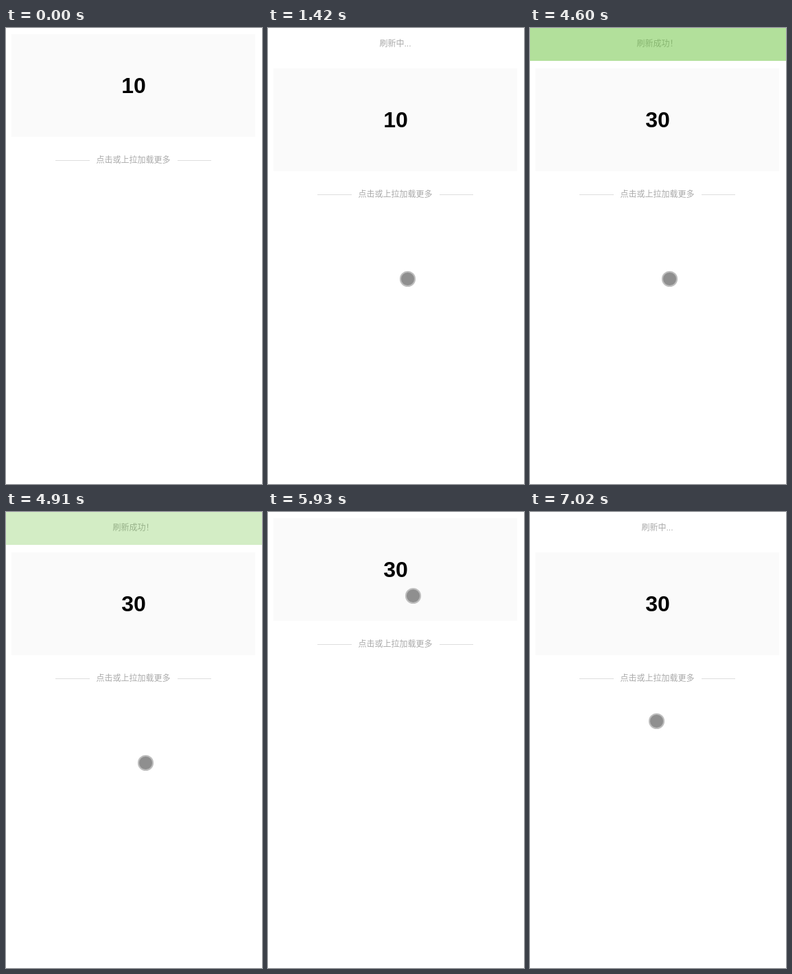
An HTML page for the animation above (8000 ms loop, 373x666 px).

```html
<!DOCTYPE html>
<html lang="zh-CN">
<head>
<meta charset="utf-8">
<title>Pull to refresh</title>
<style>
  html, body { margin: 0; width: 100%; height: 100%; overflow: hidden; background: #fff; }
  svg { display: block; width: 373px; height: 666px; }
  text { font: 12px "Liberation Sans", "Noto Sans CJK SC", "Noto Sans CJK", sans-serif; text-anchor: middle; fill: #aaa; }
  #count { font-size: 32px; font-weight: bold; fill: #000; }
  #touch { fill: #8f8f8f; stroke: #bebebe; stroke-width: 2; }
  #touch.pressed { fill: #c4c046; stroke: #e4e05a; }
</style>
</head>
<body>
<svg viewBox="0 0 373 666">
  <g id="page">
    <text id="status" x="185.5" y="-23"></text>
    <rect x="8" y="9" width="355" height="150" fill="#fafafa"/>
    <text id="count" x="186" y="95"></text>
    <path d="M72 193.5h50M250 193.5h49" stroke="#ddd"/>
    <text x="185.5" y="197">点击或上拉加载更多</text>
  </g>
  <rect id="flash" height="48" fill="#67c23a"/>
  <circle id="touch" r="10.6"/>
</svg>
<script>
const LOOP = 8000, HEAD = 50, LOADED = 4370, CLOSE = 5000;
const [page, status, count, flash, touch] =
  ['page', 'status', 'count', 'flash', 'touch'].map(id => document.getElementById(id));

const moves = [
  { start: 70, end: 720, x: 211, y: 144 },
  { start: 790, end: 1250, x: 203, y: 366 },
  { start: 5060, end: 5840, x: 211, y: 122 },
  { start: 5990, end: 7020, x: 184, y: 305 }
];
const pulls = [
  { press: 790, release: 1420, settled: 1420 },
  { press: 5990, release: 6710, settled: 7020 }
];

const set = (el, attrs) => Object.entries(attrs).forEach(([k, v]) => el.setAttribute(k, v));
const mix = (a, b, u) => a + (b - a) * u;

// Ease-out progress from 0 at start to 1 at end
function progress(t, start, end) {
  if (t >= end) return 1;
  return t <= start ? 0 : 1 - ((end - t) / (end - start)) ** 2;
}

function touchAt(t) {
  return moves.reduce((p, m) => {
    const u = progress(t, m.start, m.end);
    return { x: mix(p.x, m.x, u), y: mix(p.y, m.y, u) };
  }, { x: 290, y: 610 });
}

// The page follows the finger at half speed, then rests at the head height
function pageOffset(t, pull) {
  if (!pull) return 0;
  const drag = (touchAt(Math.min(t, pull.release)).y - touchAt(pull.press).y) / 2;
  const open = mix(drag, HEAD, progress(t, pull.release, pull.settled) * (t >= pull.release));
  return pull === pulls[0] ? open * (1 - progress(t, CLOSE, CLOSE + 300)) : open;
}

function statusText(t, pull, offset) {
  if (!pull || t < pull.release) return offset < HEAD ? '下拉即可刷新...' : '释放即可刷新...';
  return pull === pulls[0] && t >= LOADED ? '刷新成功！' : '刷新中...';
}

function draw(t) {
  const pull = pulls.filter(p => t >= p.press).pop();
  const offset = pageOffset(t, pull);
  set(page, { transform: `translate(0 ${Math.round(offset)})` });
  status.textContent = statusText(t, pull, offset);
  count.textContent = t < LOADED ? 10 : 30;

  const age = Math.max(0, t - LOADED + 70);
  const half = age * 83 / 70;
  set(flash, {
    x: 189 - half,
    width: half * 2,
    opacity: t < LOADED ? 0 : Math.max(0, 0.72 * (1 - age / 1020))
  });

  const { x, y } = touchAt(t);
  set(touch, {
    cx: x + 0.5,
    cy: y + 0.5,
    class: pull && t < pull.release ? 'pressed' : '',
    visibility: t < moves[0].start ? 'hidden' : 'visible'
  });
}

const begin = performance.now();
function loop() {
  draw((performance.now() - begin) % LOOP);
  requestAnimationFrame(loop);
}
loop();
</script>
</body>
</html>
```
